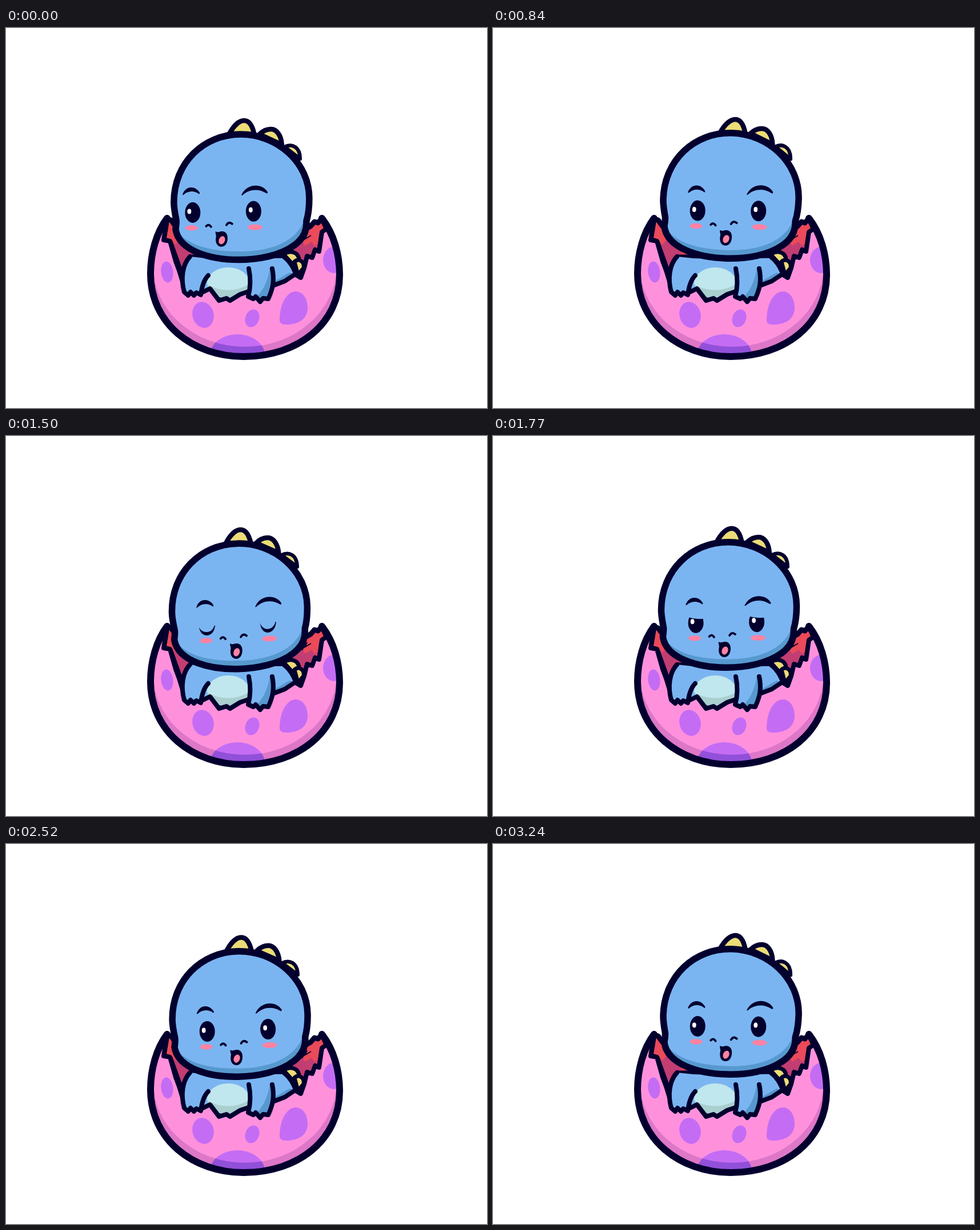
An HTML page that plays this animation: 842 px wide and 665 px high, repeating every 3.27 s.

```html
<!DOCTYPE html>
<html lang="en">
<head>
<meta charset="utf-8">
<title>Hatchling</title>
<style>
  html, body { margin: 0; width: 100%; height: 100%; overflow: hidden; background: #fff; }
  svg { display: block; width: 842px; height: 665px; }
  .ink { stroke: #03002e; stroke-linecap: round; stroke-linejoin: round; }
  .line { fill: none; }
  .dark { fill: #03002e; }
  .blue { fill: #7ab5f2; }
  .shade { fill: #5799cf; }
  .yellow { fill: #ebdc76; }
  .spot { fill: #c56cf5; }
  .blush { fill: #ff82a3; }
</style>
</head>
<body>
<svg viewBox="0 0 842 665">
  <defs>
    <path id="shell" d="M282 334C263 358 253 395 253 430C253 517 327 575 416 575C512 575 584 517 584 432
      C584 400 576 372 563 350L553 357L548 391L541 388L536 402L527 399L522 420L516 437L506 431L488 443
      L467 451L428 460L410 466L392 477L386 473L373 477L357 456L345 462L315 463L303 424L297 408L287 373L276 371Z"/>
    <path id="skull" d="M411 186C476 186 531 236 531 298C531 315 529 328 526 338C527 354 520 369 505 380
      C480 399 440 405.5 407 405.5C360 405.5 303 391 297 352C298 345 299 340 298 335C296 325 294 312 294 305
      C294 236 346 186 411 186Z"/>
    <path id="back" d="M282 334L276 370L287 374L305 424L400 440L516 436L572 375L553 333L546 341L540 339
      L533 347L520 354L400 340L297 347L289 336Z"/>
    <path id="rightArm" d="M425 420C429 440 428 455 424 470L433 474L437 470L445 479L450 473L459 474
      C468 455 470 440 466 420Z"/>
    <path id="crescent" fill-rule="evenodd"
      d="M240 320H600V590H240ZM257 415A161 143 0 0 0 579 415V320H257Z"/>
    <ellipse id="baseSpot" cx="405" cy="573" rx="48" ry="37"/>
    <clipPath id="inShell"><use href="#shell"/></clipPath>
    <clipPath id="inSkull"><use href="#skull"/></clipPath>
    <clipPath id="inBack"><use href="#back"/></clipPath>
    <clipPath id="inArm"><use href="#rightArm"/></clipPath>
    <clipPath id="inBaseSpot"><use href="#baseSpot"/></clipPath>
    <clipPath id="inBelly"><ellipse cx="389" cy="446" rx="37" ry="27"/></clipPath>
    <clipPath id="underLidL"><path/></clipPath>
    <clipPath id="underLidR"><path/></clipPath>
  </defs>

  <!-- inside of the shell and wings -->
  <use href="#back" fill="#ea4a59"/>
  <g clip-path="url(#inBack)" fill="#c23e72">
    <path d="M280 382L290 372L297 379L304 370L330 380V430H290Z"/>
    <path d="M495 392L517 372L524 381L535 374L540 381L555 374L540 420L510 440Z"/>
    <path d="M518 375L527 361L524 369L534 363" fill="none" stroke="#03002e" stroke-width="2"/>
  </g>
  <use href="#back" class="ink line" stroke-width="9"/>

  <!-- body -->
  <g class="ink yellow" stroke-width="7">
    <path d="M486 396C497 388 512 392 513 405L506 418Z"/>
    <path d="M505 409C513 401 523 410 521 420L511 432Z"/>
  </g>
  <path class="ink blue" stroke-width="7" d="M322 400C305 420 310 450 330 475H440L508 433C503 420 497 408 484 399Z"/>
  <path class="shade" d="M466 444C482 438 490 430 497 428L506 432L486 445L466 452Z"/>
  <g clip-path="url(#inBelly)">
    <path fill="#c0e7ee" d="M350 415H428V480H350Z"/>
    <path fill="#a9cfcf" d="M350 448Q389 470 428 447V480H350Z"/>
  </g>

  <!-- front of the shell -->
  <use href="#shell" fill="#ff91dc"/>
  <g clip-path="url(#inShell)">
    <g class="spot">
      <ellipse cx="282" cy="427" rx="10.5" ry="18.5" transform="rotate(-7 282 427)"/>
      <ellipse cx="345" cy="502" rx="18.5" ry="23" transform="rotate(-15 345 502)"/>
      <ellipse cx="431" cy="508" rx="12" ry="16" transform="rotate(20 431 508)"/>
      <path d="M479 511C479 485 490 461 508 461C520 461 528 475 528 489C528 511 510 519 490 519C482 519 479 516 479 511Z"/>
      <ellipse cx="574" cy="406" rx="19" ry="23"/>
      <use href="#baseSpot"/>
    </g>
    <use href="#crescent" fill="#46006e" fill-opacity=".18"/>
    <use href="#crescent" fill="#9150d9" clip-path="url(#inBaseSpot)"/>
  </g>
  <use href="#shell" class="ink line" stroke-width="8"/>
  <path class="ink line" stroke-width="12" d="M282 333C263 358 253 395 253 430C253 517 327 575 416 575
    C512 575 584 517 584 432C584 397 574 360 553 333"/>

  <!-- arms -->
  <path class="blue" d="M322 400C308 415 306 440 312 462L319 468L323 462L329 468L333 463L341 467C344 450 348 440 357 431L370 405Z"/>
  <path class="ink line" stroke-width="8" d="M322 400C308 415 306 440 312 462L319 468L323 462L329 468L333 463L341 467C343 451 347 440 354 433"/>
  <use href="#rightArm" class="blue"/>
  <path class="shade" clip-path="url(#inArm)" d="M462 418C459 444 449 462 434 476H470V418Z"/>
  <path class="ink line" stroke-width="8" d="M425 421C429 440 428 455 424 470L433 474L437 470L445 479L450 473L459 474C468 455 470 440 466 421"/>

  <!-- head -->
  <g id="head">
    <g class="ink yellow" stroke-width="8.5">
      <path d="M390 187C399 170 409 162 417 162C426 162 432 172 435 187Z"/>
      <path d="M444 186C452 178 459 177 464 177C474 177 482 188 483 204Z"/>
      <path d="M488 208C500 202 515 207 515 229Z" stroke-width="6.5"/>
    </g>
    <use href="#skull" class="blue"/>
    <path class="shade" clip-path="url(#inSkull)" d="M290 340C308 380 355 391 410 391C470 391 522 370 527 315L545 315V420H280Z"/>
    <use href="#skull" class="ink line" stroke-width="11.5"/>
    <g id="face">
      <path class="dark" d="M309 292C314 276 331 275 339 288Q340 292 337 290C329 284 318 285 311 292Z"/>
      <path class="dark" d="M412 293C421 272 448 271 458 287Q459 291 455 289C442 281 426 282 414 293Z"/>
      <ellipse class="blush" cx="325" cy="350" rx="11" ry="4.7"/>
      <ellipse class="blush" cx="436" cy="349" rx="13" ry="5"/>
      <g id="openEyes">
        <g clip-path="url(#underLidL)">
          <ellipse class="dark" cx="327" cy="323" rx="13.5" ry="18"/>
          <ellipse cx="321" cy="321" rx="3.4" ry="4.5" fill="#fff"/>
        </g>
        <g clip-path="url(#underLidR)">
          <ellipse class="dark" cx="433.5" cy="321" rx="13.5" ry="18"/>
          <ellipse cx="428.5" cy="318.5" rx="3.4" ry="4.5" fill="#fff"/>
        </g>
      </g>
      <g id="shutEyes" class="dark">
        <path d="M313 326C317 338 336 339 340 324Q342 323 341 326C338 345 316 347 313 326Z"/>
        <path d="M420 321C424 336 443 336 447 320Q449 319 448 322C445 343 422 345 420 321Z"/>
      </g>
      <path class="ink line" stroke-width="3.8" d="M350.5 347Q355 342 359 348M386 345Q390 338 396 343"/>
      <path class="dark" d="M367 356C371 359 374 356 378 356C385 356 388.5 362 388 369C387.5 378 383 383 377 383C370 383 366 376 367.5 367C369 363 366 360 367 356Z"/>
      <ellipse cx="378" cy="371.5" rx="5.3" ry="7.3" transform="rotate(22 378 371.5)" fill="#ff82a3"/>
    </g>
  </g>
</svg>
<script>
  const LOOP = 3270, STEP = 30, SWAY = 1180;
  const el = id => document.getElementById(id);
  const ease = (t, from, to) => {
    const p = Math.min(1, Math.max(0, (t - from) / (to - from)));
    return p * p * (3 - 2 * p);
  };

  function setLid(id, left, y, tilt) {
    el(id).firstElementChild.setAttribute('d',
      `M${left} ${y - tilt}Q${left + 15} ${y + 4} ${left + 30} ${y + tilt}V350H${left}Z`);
  }

  function draw(t) {
    const phase = 2 * Math.PI * (t - 2050) / SWAY;
    const tilt = (0.001 + 0.0235 * Math.cos(phase)) * 180 / Math.PI;
    el('head').setAttribute('transform', `rotate(${tilt} 505 466)`);

    // the face trails the sway of the head
    const faceX = 27.7 * ease(t, 0, 480);
    const faceY = 2 - 3.3 * Math.cos(phase - 0.84);
    el('face').setAttribute('transform', `translate(${faceX} ${faceY})`);

    const lid = ease(t, 990, 1140) * (1 - ease(t, 1650, 1890));
    const shut = lid > 0.75;
    el('openEyes').style.display = shut ? 'none' : '';
    el('shutEyes').style.display = shut ? '' : 'none';
    setLid('underLidL', 312, 301 + 26 * lid, 3 * lid);
    setLid('underLidR', 418.5, 299 + 26 * lid, 2 * lid);
  }

  const start = performance.now();
  function tick() {
    const t = (performance.now() - start) % LOOP;
    draw(Math.floor(t / STEP) * STEP);
    requestAnimationFrame(tick);
  }
  draw(0);
  requestAnimationFrame(tick);
</script>
</body>
</html>
```
